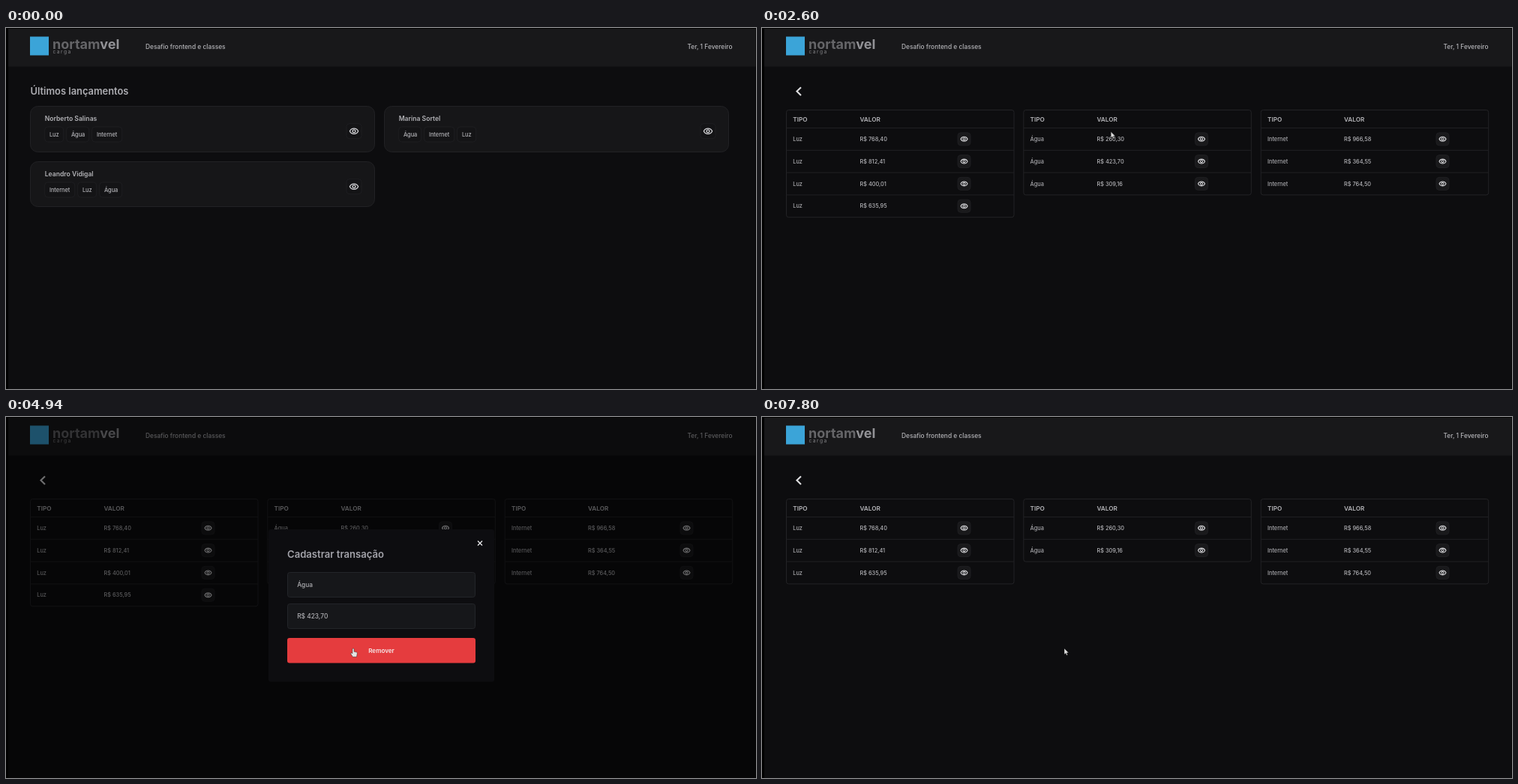
Recreate the animation shown at these times as an HTML page. Size 1000 by 482 pixels, loop 8 s.

```html
<!DOCTYPE html>
<html lang="pt">
<head>
<meta charset="utf-8">
<title>Lançamentos</title>
<style>
  html, body { margin: 0; width: 100%; height: 100%; overflow: hidden; background: #000; }
  svg { display: block; width: 100vw; height: 100vh; }
  text { font-family: Inter, "Liberation Sans", sans-serif; white-space: pre; }
</style>
</head>
<body>
<svg id="stage" viewBox="0 0 1000 482">
  <defs>
    <g id="eye" fill="none" stroke="#d6d6d9">
      <path d="M-5.3 0C-3.2 -4.6 3.2 -4.6 5.3 0C3.2 4.6 -3.2 4.6 -5.3 0Z" stroke-width="1.25"/>
      <circle r="1.8" stroke-width="1.25"/>
    </g>
    <path id="arrow" d="M0 0V8L1.9 6.4L3.2 9.2L4.5 8.6L3.3 5.9L5.8 5.7Z" fill="#dedede" stroke="#111" stroke-width=".4"/>
    <path id="hand" d="M-1.1 1Q-1 0 0 0Q1 0 1.1 1V4.3L4.4 5.1Q5.4 5.4 5.3 6.5L4.5 11.3H-.6L-3.4 7Q-3.5 5.6 -2.2 6L-1.1 6.8Z" fill="#e4e4e4" stroke="#111" stroke-width=".4"/>
  </defs>
  <rect x="3" y="1" width="996.5" height="481" fill="#0d0d0f"/>
  <rect x="3" y="1" width="996.5" height="50.5" fill="#18181a"/>
  <g id="header"></g>
  <g id="page"></g>
  <g id="modal"></g>
  <use id="cursor"/>
</svg>
<script>
const LOOP = 8000, TICK = 130;
const PAGE = 2600, OPEN_A = 3770, CLOSE_A = 5330, OPEN_B = 6630, CLOSE_B = 7540;
const el = id => document.getElementById(id);

// time, x, y of the pointer tip
const path = [
  [1430, 966, 470], [1560, 790, 345], [1690, 570, 205], [1820, 463, 152],
  [2210, 464, 138], [2860, 466, 139], [3510, 582, 174], [4030, 582, 174],
  [4940, 463, 309], [5460, 463, 309], [5980, 291, 210], [6370, 270, 206],
  [6630, 270, 206], [7280, 392, 292], [7410, 403, 309], [LOOP, 403, 309]
];

const text = (x, y, size, str, fill = '#b4b4b8', weight = 500, more = '') =>
  `<text x="${x}" y="${y}" font-size="${size}" fill="${fill}" font-weight="${weight}" ${more}>${str}</text>`;
const box = (x, y, w, h, r, fill, stroke = 'none') =>
  `<rect x="${x}" y="${y}" width="${w}" height="${h}" rx="${r}" fill="${fill}" stroke="${stroke}"/>`;
const eye = (x, y, size, scale, fill, stroke) =>
  box(x - size / 2, y - size / 2, size, size, 4, fill, stroke) +
  `<use href="#eye" transform="translate(${x} ${y}) scale(${scale})"/>`;

function header() {
  return box(32, 11.5, 25, 25, 0, '#3ba4d8') +
    text(62, 28, 18, 'nortam<tspan fill="#929296">vel</tspan>', '#656568', 700) +
    text(62.5, 34, 6.6, 'carga', '#858588', 400, 'letter-spacing="1.5"') +
    text(186, 27.6, 8.4, 'Desafio frontend e classes') +
    text(968.5, 27.6, 8.4, 'Ter, 1 Fevereiro', '#b4b4b8', 500, 'text-anchor="end"');
}

const chipWidth = { Luz: 25, 'Água': 30, Internet: 40 };

function card(x, y, h, name, tags) {
  let out = box(x, y, 459, h, 10, '#161618', '#222225') +
    text(x + 19.2, y + 19.8, 8.6, name, '#b4b4b8', 600);
  let cx = x + 19.2;
  for (const tag of tags) {
    out += box(cx, y + 27.5, chipWidth[tag], 20, 4, '#141416', '#1e1e21') +
      text(cx + 6.2, y + 40.2, 7.4, tag);
    cx += chipWidth[tag] + 4;
  }
  return out + eye(x + 431.5, y + 33.2, 20, 1.06, '#141416', '#1e1e21');
}

function cards() {
  return text(32.5, 89, 12.9, 'Últimos lançamentos', '#adadb2', 600) +
    card(32.5, 104.5, 61, 'Norberto Salinas', ['Luz', 'Água', 'Internet']) +
    card(504.5, 104.5, 61, 'Marina Sortel', ['Água', 'Internet', 'Luz']) +
    card(32.5, 178.5, 60, 'Leandro Vidigal', ['Internet', 'Luz', 'Água']);
}

function table(x, valueX, eyeX, type, values) {
  const rowH = 29.8, w = 303.5;
  let out = box(x, 109.5, w, 24 + values.length * rowH, 3, '#0d0d0f', '#232326') +
    text(x + 8.8, 124.8, 8.2, 'TIPO', '#b4b4b8', 600) +
    text(valueX, 124.8, 8.2, 'VALOR', '#b4b4b8', 600);
  values.forEach((value, i) => {
    const y = 133.5 + i * rowH;
    out += `<path d="M${x} ${y}h${w}" stroke="#202023"/>` +
      text(x + 8.8, y + 17.4, 7.35, type, '#a9a9ad') +
      text(valueX, y + 17.4, 7.35, 'R$ ' + value, '#b4b4b8') +
      eye(eyeX, y + 14.8, 17, .86, '#19191b', '#1f1f22');
  });
  return out;
}

function tables(t) {
  const luz = ['768,40', '812,41', '400,01', '635,95'];
  const agua = ['260,30', '423,70', '309,16'];
  if (t >= CLOSE_A) agua.splice(1, 1);
  if (t >= CLOSE_B) luz.splice(2, 1);
  return '<path d="M52 79.3L46.5 84.6L52 90" fill="none" stroke="#dedee0" stroke-width="2.1"/>' +
    table(32.5, 130.5, 269.5, 'Luz', luz) +
    table(348.8, 446.5, 586, 'Água', agua) +
    table(665.2, 776, 907.5, 'Internet', ['966,58', '364,55', '764,50']);
}

function modal(type, value, hover) {
  const field = (y, str) => box(375.5, y, 250, 33, 3, '#16171a', '#232529') +
    text(388.2, y + 19.6, 8.35, str, '#b0b0b4');
  return '<rect width="1000" height="482" fill="#000" opacity=".5"/>' +
    box(350, 150, 301, 203.5, 3, '#0d0d10') +
    '<path d="M629 165.5l6 6m0 -6l-6 6" stroke="#e8e8ea" stroke-width="1.3"/>' +
    text(375, 187.6, 13.1, 'Cadastrar transação', '#a3a3aa', 600) +
    field(207.5, type) + field(249.5, 'R$ ' + value) +
    box(375, 295, 251, 33.5, 3, hover ? '#e53c3e' : '#ff4545') +
    text(500.5, 315, 8.1, 'Remover', '#f4e8e8', 600, 'text-anchor="middle"');
}

function pointer(t) {
  const i = path.findIndex(p => p[0] > t);
  if (i < 1) return null;
  const [t0, x0, y0] = path[i - 1], [t1, x1, y1] = path[i];
  const k = (t - t0) / (t1 - t0);
  return [x0 + (x1 - x0) * k, y0 + (y1 - y0) * k];
}

const shown = {};
function fill(id, html) {
  if (shown[id] !== html) el(id).innerHTML = shown[id] = html;
}

function draw(ms) {
  const t = Math.floor(ms / TICK) * TICK;
  const first = t >= OPEN_A && t < CLOSE_A, second = t >= OPEN_B && t < CLOSE_B;
  const pos = pointer(t);
  const near = (x, y, r) => Math.abs(pos[0] - x) <= r && Math.abs(pos[1] - y) <= r;
  let hover = false, hand = false;
  if (pos) {
    const [x, y] = pos;
    hover = (first || second) && x > 375 && x < 626 && y > 295 && y < 328;
    if (first || second) hand = hover;
    else if (t < PAGE) hand = near(464, 138, 10);
    else hand = near(586, 178, 8.5) || near(269.5, 208, 8.5);
  }
  fill('page', t < PAGE ? cards() : tables(t));
  fill('modal', first ? modal('Água', '423,70', hover) : second ? modal('Luz', '400,01', hover) : '');
  const cursor = el('cursor');
  cursor.setAttribute('visibility', pos ? 'visible' : 'hidden');
  if (pos) {
    cursor.setAttribute('href', hand ? '#hand' : '#arrow');
    cursor.setAttribute('transform', `translate(${pos[0].toFixed(2)} ${pos[1].toFixed(2)})`);
  }
}

fill('header', header());
const start = performance.now();
function loop() {
  draw((performance.now() - start) % LOOP);
  requestAnimationFrame(loop);
}
loop();
</script>
</body>
</html>
```
